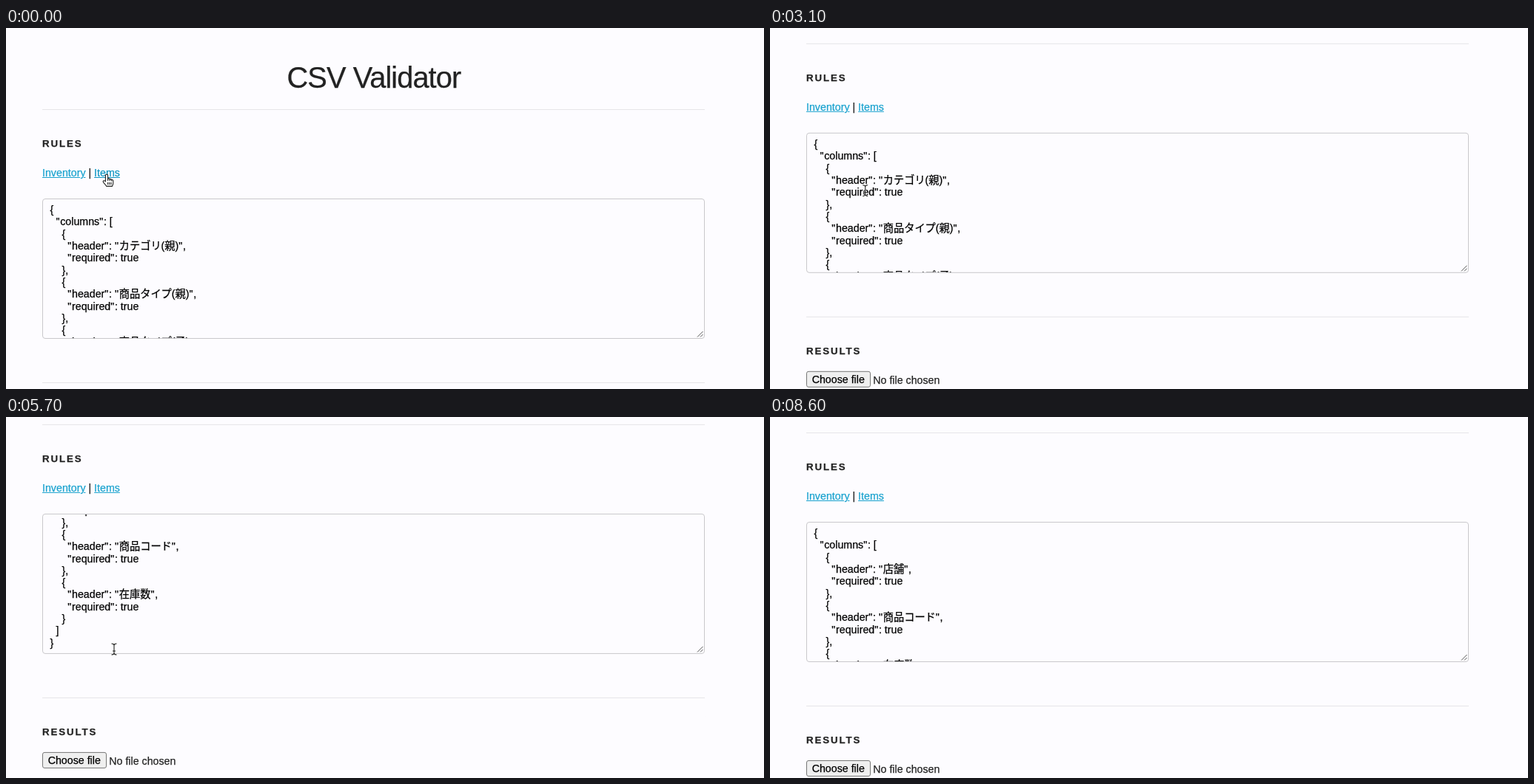
Recreate the animation shown at these times as an HTML page. Size 1024 by 489 pixels, loop 8700 ms.

```html
<!DOCTYPE html>
<html lang="en">
<head>
<meta charset="utf-8">
<title>CSV Validator</title>
<style>
  html, body { margin: 0; width: 100%; height: 100%; overflow: hidden; background: #fdfcff; }
  body { position: relative; color: #222; cursor: default; -webkit-text-stroke: .25px currentColor;
    font: 14.22px/16px "Liberation Sans", "Noto Sans CJK JP", Arial, sans-serif; }
  #page, #page > *, #mouse, #thumb, #code, #grip { position: absolute; margin: 0; }
  #page { left: 0; top: 0; width: 1024px; height: 600px; }
  h1 { left: 49.6px; width: 894.6px; top: 46.7px; text-align: center;
    font-size: 39.8px; line-height: 40px; font-weight: 400; letter-spacing: -.95px; }
  h2 { left: 49px; font-size: 13.27px; line-height: 16px; letter-spacing: 1.9px; }
  hr { left: 49px; width: 895px; height: 1px; border: 0; background: #e6e5e8; }
  #links { left: 49px; top: 188px; white-space: pre; }
  #links span { color: #1ba3cf; text-decoration: underline; }
  #links span.hover { color: #0f96c2; }
  #box { left: 49px; top: 231px; width: 895px; height: 190px; box-sizing: border-box;
    border: 1px solid #c9c8cb; border-radius: 4px; overflow: hidden; color: #000; }
  #code { left: 9.6px; top: 6.2px; font: inherit; line-height: 16.3px; white-space: pre; }
  #code i { font-style: normal; letter-spacing: .7px; }
  #thumb { right: 2px; width: 7px; border-radius: 4px; background: #000; }
  #grip { right: 0; bottom: 0; }
  #pick { left: 49px; top: 554px; width: 86.5px; height: 22px; box-sizing: border-box;
    border: 1px solid #767676; border-radius: 3px; background: #efefef; color: #000;
    text-align: center; line-height: 21px; white-space: nowrap; }
  #none { left: 139.3px; top: 557.5px; }
  #mouse { left: 0; top: 0; overflow: visible; }
</style>
</head>
<body>
<div id="page">
  <h1>CSV Validator</h1>
  <hr style="top:110px">
  <h2 style="top:149.4px">RULES</h2>
  <div id="links"><span>Inventory</span> | <span>Items</span></div>
  <div id="box">
    <pre id="code"></pre>
    <div id="thumb"></div>
    <svg id="grip" width="11" height="11" fill="none" stroke="#555"><path d="M2 9.5L9.5 2M6 9.5L9.5 6"/></svg>
  </div>
  <hr style="top:480px">
  <h2 style="top:518.9px">RESULTS</h2>
  <div id="pick">Choose file</div>
  <div id="none">No file chosen</div>
</div>
<svg id="mouse" width="1" height="1">
  <defs><path id="bar" d="M-3.5-7Q-.5-7 0-5Q.5-7 3.5-7M0-5V6M-3.5 8Q-.5 8 0 6Q.5 8 3.5 8M-2 3H2"/></defs>
  <g id="hand" fill="#fff" stroke="#222" stroke-width="1.1" stroke-linejoin="round">
    <path d="M-1.6 9V1Q-1.6-.8 0-.8T1.6 1V5.2Q3.6 4.4 4.2 5.8Q6 5.2 6.6 6.6Q8.8 6.2 8.8 8.6V11Q8.8 13 7.4 15.4H-.2Q-1.4 13.6-3.4 11.4Q-5.6 9-4.4 8Q-3.2 7.2-1.6 9Z"/>
    <path d="M1.6 10v3.2M3.8 10v3.2M6 10v3.2M1.6 5v3M4.2 5.8v2.4M6.6 6.6v2"/>
  </g>
  <path id="arrow" d="M0 0V13.6L3.1 10.7L5.2 15.4L7.4 14.4L5.4 9.9H9.6Z" fill="#000" stroke="#fff"/>
  <g id="beam" fill="none">
    <use href="#bar" stroke="#fff" stroke-width="2.4" opacity=".7"/>
    <use href="#bar" stroke="#222" stroke-width="1.1"/>
  </g>
</svg>
<script>
const LOOP = 8700, STEP = 100;
const VIEW = 188, LINE = 16.3, PAD = 12.4;
const $ = id => document.getElementById(id);

const rules = {
  items: ['カテゴリ(親)', '商品タイプ(親)', '商品タイプ(子)', '商品コード', '商品名',
    'カラー', 'サイズ', '上代', '元上代', '商品コメント'],
  inventory: ['店舗', '商品コード', '在庫数']
};

// Pointer stops: start, end, x, y
const stops = [
  [400, 800, 88, 196], [1500, 1900, 132, 196], [2000, 2300, 128.7, 219.7], [3900, 4500, 82, 106],
  [4900, 5300, 146, 314], [5900, 6300, 165, 281], [7300, 7700, 450, -30]
];

const clamp = v => Math.min(1, Math.max(0, v));
const ease = p => p < .5 ? 2 * p * p : 1 - 2 * (1 - p) ** 2;
const glide = (t, a, b) => ease(clamp((t - a) / (b - a)));

// Elastic overscroll: quick rise, slow settling
function bounce(t, start, tau, height) {
  const x = Math.max(0, t - start) / tau;
  return height * x * Math.exp(1 - x);
}

// Scrollbar is visible from a, then fades out after b
const flash = (t, a, b) => t > a ? .53 * clamp(1 - (t - b) / 300) : 0;

function pointer(t) {
  let x = 136, y = 199;
  for (const [a, b, toX, toY] of stops) {
    const p = glide(t, a, b);
    x += (toX - x) * p;
    y += (toY - y) * p;
  }
  return [x, y];
}

function toJson(name) {
  const columns = rules[name].map(header => ({ header, required: true }));
  return JSON.stringify({ columns }, null, 2);
}

const links = [...document.querySelectorAll('#links span')];
let shown = '';

function showRules(name) {
  if (name === shown) return;
  shown = name;
  $('code').innerHTML = toJson(name).replace(/"/g, '<i>"</i>');
}

function drawMouse(x, y) {
  const hits = el => {
    const r = el.getBoundingClientRect();
    return x > r.left && x < r.right && y > r.top && y < r.bottom;
  };
  const link = links.find(hits);
  const kind = link ? 'hand' : hits($('box')) ? 'beam' : 'arrow';
  for (const id of ['hand', 'beam', 'arrow']) $(id).style.display = id === kind ? '' : 'none';
  for (const el of links) el.classList.toggle('hover', el === link);
  $('mouse').style.transform = `translate(${x}px,${y}px)`;
}

function draw(t) {
  const name = t < 1000 || (t >= 2000 && t < 4900) ? 'items' : 'inventory';
  showRules(name);

  const scroll = 89 * glide(t, 2400, 2800) + bounce(t, 2600, 80, 6) + bounce(t, 5300, 150, 22);
  $('page').style.transform = `translateY(${-scroll}px)`;

  const full = (rules[name].length * 4 + 4) * LINE + PAD;
  const part = glide(t, 3300, 3900) - glide(t, 6000, 6400);
  $('code').style.transform = `translateY(${-part * (full - VIEW)}px)`;

  const size = 165 * VIEW / full + 2;
  const thumb = $('thumb').style;
  thumb.height = size + 'px';
  thumb.top = 2 + (169 - size) * part + 'px';
  thumb.opacity = flash(t, 3300, 3900) + flash(t, 6000, 6900);

  drawMouse(...pointer(t));
}

const start = performance.now();
function tick() {
  const t = (performance.now() - start) % LOOP;
  draw(Math.floor(t / STEP) * STEP);
  requestAnimationFrame(tick);
}
tick();
</script>
</body>
</html>
```
